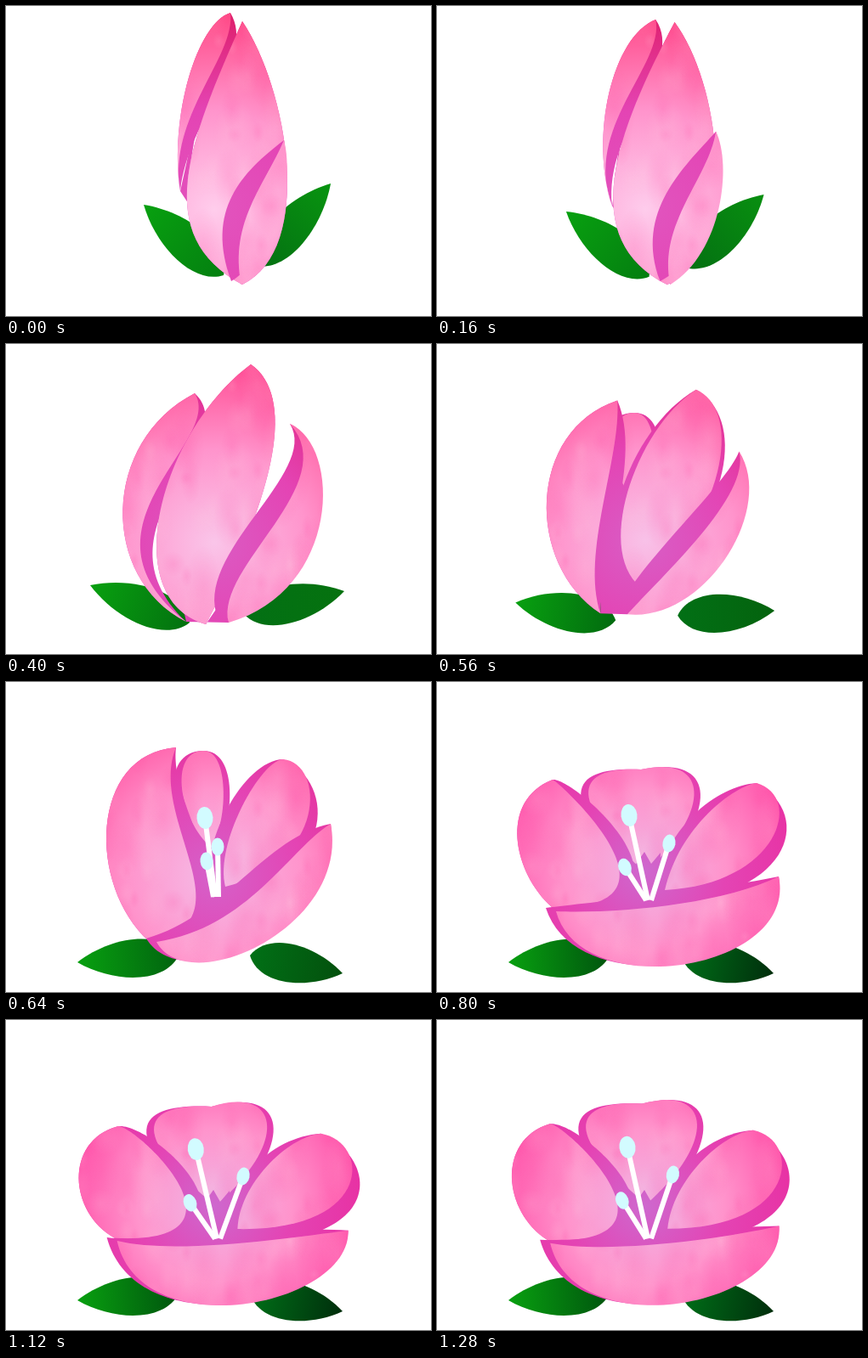
Write an HTML page with a canvas that moves like this. It is 500 px wide and 365 px high and loops after 1.44 s.

```html
<!DOCTYPE html>
<html lang="en">
<head>
<meta charset="utf-8">
<title>Opening flower</title>
<style>
html, body { margin: 0; width: 100%; height: 100%; overflow: hidden; background: #fff; }
canvas { display: block; width: 500px; height: 365px; }
</style>
</head>
<body>
<canvas id="stage" width="500" height="365"></canvas>
<script>
const W = 500, H = 365, LOOP = 1440, STEP = 80, LAST = 1280;
const ctx = document.getElementById('stage').getContext('2d');

// A petal is two curves: base, two handles, tip, two handles back to the base.
// Each row is one stage of opening, from bud (0) to wide open (4).
const left = [
  [205,218, 192,130, 225,20, 264,8, 270,60, 190,130],
  [212,327, 110,275, 112,115, 222,58, 258,115, 70,215],
  [168,305, 96,240, 98,85, 200,77, 165,160, 292,285],
  [135,265, 90,225, 72,140, 136,115, 135,110, 315,270],
  [122,250, 60,228, 66,145, 126,134, 150,120, 305,262]
];
const right = [
  [278,328, 170,270, 215,160, 278,18, 330,95, 365,285],
  [235,330, 130,300, 180,105, 288,24, 340,60, 320,170],
  [258,241, 245,190, 300,92, 326,91, 375,95, 378,212],
  [268,245, 285,170, 350,122, 376,119, 432,135, 402,238],
  [276,247, 265,215, 315,150, 366,146, 425,150, 460,258]
];
const front = [
  [277,328, 262,255, 305,210, 327,158, 338,200, 325,290],
  [262,328, 245,262, 398,165, 334,94, 395,120, 394,290],
  [177,306, 285,290, 335,195, 382,167, 405,288, 215,375],
  [140,270, 210,273, 335,262, 402,229, 425,340, 170,380],
  [123,252, 190,280, 335,252, 403,263, 390,335, 150,390]
];
// The back petal and the stamens only show from stage 2 on.
const back = [
  [242,195, 205,165, 190,82, 232,81, 262,80, 262,160],
  [245,225, 140,125, 175,100, 240,103, 320,85, 325,150],
  [248,225, 120,130, 175,108, 243,112, 320,82, 345,145]
];
const stamens = [ // foot, then three heads
  [246,253, 234,160, 249,194, 236,211],
  [248,257, 226,157, 273,190, 221,218],
  [248,258, 221,159, 284,190, 213,224]
];
// Leaves: tip and root.
const leafL = [[162,234, 256,317], [99,284, 216,328], [84,330, 203,322]];
const leafR = [[382,209, 295,306], [398,291, 280,318], [396,343, 287,322]];

const mix = (a, b, u) => a + (b - a) * u;
const clamp = (v, lo, hi) => Math.max(lo, Math.min(hi, v));
const blend = (a, b, u) => `rgb(${a.map((v, i) => Math.round(mix(v, b[i], u)))})`;

function at(rows, stage) {
  const s = clamp(stage, 0, rows.length - 1), i = Math.min(Math.floor(s), rows.length - 2);
  return rows[i].map((v, k) => mix(v, rows[i + 1][k], s - i));
}

// The flower opens in bursts, then springs back a little.
const easeIn = u => u * u, linear = u => u, easeOut = u => u * (2 - u);
const moves = [
  [0, 400, 0, 1, easeIn], [400, 640, 1, 2, easeIn], [640, 800, 2, 3, linear],
  [800, 960, 3, 4, linear], [960, 1280, 4, 3.4, easeOut]
];
function stageAt(t) {
  const [t0, t1, a, b, ease] = moves.find(m => t < m[1]) || moves[moves.length - 1];
  return mix(a, b, ease(clamp((t - t0) / (t1 - t0), 0, 1)));
}

function petalPath([bx, by, ...rest]) {
  const path = new Path2D();
  path.moveTo(bx, by);
  path.bezierCurveTo(...rest.slice(0, 6));
  path.bezierCurveTo(...rest.slice(6), bx, by);
  return path;
}

// The inner face is the petal with its base and sides pushed outwards.
function innerFace(p, base, near, far, amount = 1) {
  const push = [base, near, near, [0, 0], far, far].flat();
  return p.map((v, k) => v + push[k] * amount);
}

// Middle of a petal's first or second side.
function middle(p, side) {
  const q = side ? [...p.slice(6), p[0], p[1]] : p.slice(0, 8);
  return [0, 1].map(k => (q[k] + 3 * q[k + 2] + 3 * q[k + 4] + q[k + 6]) / 8);
}

function polygon(points) {
  const path = new Path2D();
  points.forEach(p => path.lineTo(...p));
  return path;
}

function leafPath([tx, ty, rx, ry]) {
  const dx = rx - tx, dy = ry - ty, len = Math.hypot(dx, dy);
  const on = (f, n) => [tx + dx * f - dy / len * n, ty + dy * f + dx / len * n];
  return petalPath([rx, ry, ...on(0.85, 32), ...on(0.35, 28), tx, ty, ...on(0.35, -28), ...on(0.85, -32)]);
}

// Soft watercolour streaks shared by all petals.
const wash = document.createElement('canvas');
wash.width = W;
wash.height = H;
(() => {
  const g = wash.getContext('2d');
  let seed = 7;
  const rnd = () => (seed = seed * 16807 % 2147483647) / 2147483647;
  for (let k = 0; k < 150; k++) {
    const r = 6 + rnd() * 16, tone = rnd() < 0.55 ? '255,205,225' : '255,70,160';
    g.save();
    g.translate(70 + rnd() * 350, rnd() * 345);
    g.scale(1, 1 + rnd() * 1.5);
    const soft = g.createRadialGradient(0, 0, 0, 0, 0, r);
    soft.addColorStop(0, `rgba(${tone},.14)`);
    soft.addColorStop(1, `rgba(${tone},0)`);
    g.fillStyle = soft;
    g.fillRect(-r, -r, 2 * r, 2 * r);
    g.restore();
  }
})();

function fill(path, paint) {
  ctx.fillStyle = paint;
  ctx.fill(path);
}

function fillPetal(petal, paint) {
  const path = petalPath(petal);
  fill(path, paint);
  ctx.save();
  ctx.clip(path);
  ctx.drawImage(wash, 0, 0);
  ctx.restore();
}

function gradient(g, colors) {
  colors.forEach((c, k) => g.addColorStop(k / (colors.length - 1), c));
  return g;
}

function drawLeaf(leaf, tipColor, rootColor) {
  fill(leafPath(leaf), gradient(ctx.createLinearGradient(...leaf), [tipColor, rootColor]));
}

function drawStamens([fx, fy, ...heads], lift) {
  for (let k = 0; k < 3; k++) {
    const x = heads[2 * k], y = heads[2 * k + 1] - lift, foot = fx + [0, 4, -2][k];
    const dx = foot - x, dy = fy - y, len = Math.hypot(dx, dy);
    ctx.strokeStyle = '#fff';
    ctx.lineWidth = 6;
    ctx.beginPath();
    ctx.moveTo(x + dx / len * 8, y + dy / len * 8);
    ctx.lineTo(foot, fy);
    ctx.stroke();
    ctx.fillStyle = '#d2fbff';
    ctx.beginPath();
    ctx.ellipse(x, y, k ? 7.5 : 9.5, k ? 10.5 : 13, -Math.atan2(dx, dy) * 0.6, 0, 2 * Math.PI);
    ctx.fill();
  }
}

function draw(t) {
  const stage = stageAt(t), open = Math.min(1, stage / 3), spread = clamp(stage - 1, 0, 1);
  const lift = 8 * easeOut(clamp((t - 960) / 320, 0, 1));
  const L = at(left, stage), R = at(right, stage), F = at(front, stage);
  const B = at(back, stage - 2).map((v, k) => k % 2 ? v - lift : v);

  const glow = (...colors) => gradient(
    ctx.createRadialGradient(245, 240 - 6 * stage, 0, 245, 240 - 6 * stage, 235 - 15 * stage), colors);
  const light = glow(blend([255, 205, 236], [240, 180, 228], open),
    'rgb(255,148,204)', blend([255, 70, 132], [255, 76, 166], open));
  const shade = glow(blend([226, 84, 190], [206, 104, 206], open),
    'rgb(228,68,180)', blend([222, 30, 105], [232, 48, 162], open));

  ctx.fillStyle = '#fff';
  ctx.fillRect(0, 0, W, H);

  drawLeaf(at(leafL, stage), '#08a010', blend([4, 128, 16], [0, 84, 14], open));
  drawLeaf(at(leafR, stage), blend([8, 148, 16], [0, 46, 12], open),
    blend([4, 112, 18], [0, 112, 24], open));

  const base = p => p.slice(0, 2);
  fill(polygon([base(L), middle(L, 1), middle(R, 0), base(R), middle(F, 0), base(F)]), shade);
  if (stage > 1) {
    fill(petalPath(innerFace(B, [0, 20], [-12, 0], [10, 0])), shade);
    fillPetal(B, light);
  }
  if (stage >= 3) {
    fill(polygon([[230, 220], [244, 200], [252, 214], [263, 201], [262, 256], [240, 256]]), shade);
  }

  fill(petalPath(innerFace(L, [0, 0], [0, 0], [25, 0])), shade);
  fillPetal(L, light);
  fill(petalPath(innerFace(R, [-18, 16], [-20, 0], [14, 22], spread)), shade);
  fillPetal(R, light);
  fill(petalPath(innerFace(F, [-12, -4], [-28, -14], [-6, 0])), shade);
  if (stage >= 2) drawStamens(at(stamens, stage - 2), lift);
  fillPetal(F, light);
}

const start = performance.now();
let shown = -1;
function tick() {
  const t = (performance.now() - start) % LOOP;
  const step = clamp(Math.floor(t / STEP), 0, LAST / STEP);
  if (step !== shown) draw((shown = step) * STEP);
  requestAnimationFrame(tick);
}
tick();
</script>
</body>
</html>
```
